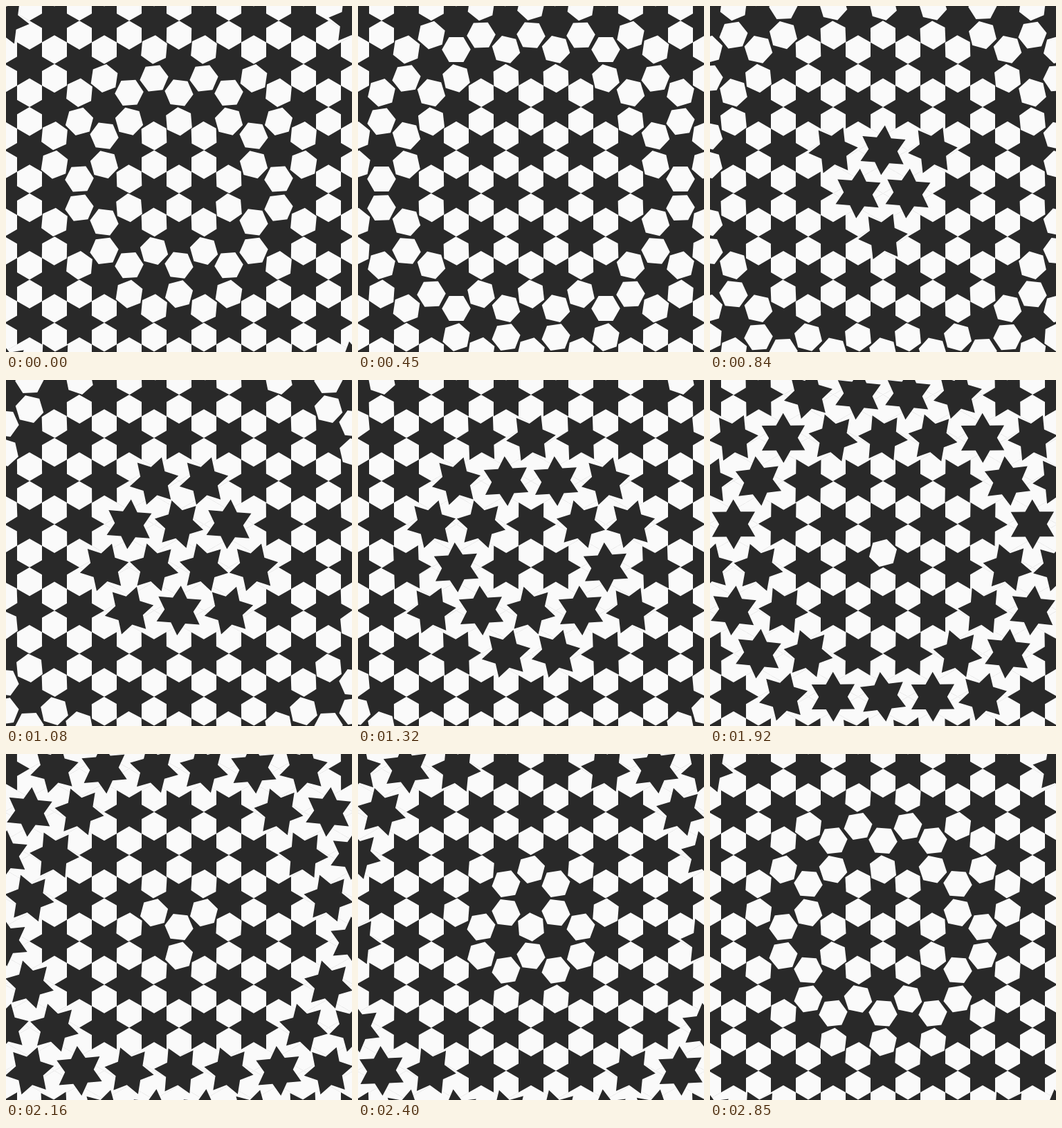
An HTML page with a canvas for the animation above (2880 ms loop, 500x500 px).

```html
<!DOCTYPE html>
<html lang="en">
<head>
<meta charset="utf-8">
<title>Stars and hexagons</title>
<style>
  html, body { margin: 0; width: 100%; height: 100%; overflow: hidden; background: #292929; }
  canvas { display: block; width: 500px; height: 500px; }
</style>
</head>
<body>
<canvas id="stage" width="500" height="500"></canvas>
<script>
const ctx = document.getElementById('stage').getContext('2d');
const DARK = '#292929', LIGHT = '#fafafa';
const LOOP = 2880, STEP = 30, TURN = 960;
const HEX_START = 1608, STAR_START = HEX_START - LOOP / 2;
const DELAY = LOOP / 500;              // ms per pixel from the centre
const GAP = 72, C = 250;
const HEX_R = GAP / 2 / Math.sqrt(3), STAR_R = GAP / 2;
const ROW = GAP * Math.sqrt(3) / 2;

const hexes = [], stars = [];
const place = (list, x, y) => list.push({ x, y, wait: Math.hypot(x - C, y - C) * DELAY });

for (let row = -5; row <= 5; row++) {
  const y = C + HEX_R + row * ROW;
  const shift = row % 2 ? 0 : GAP / 2;
  for (let col = -5; col <= 5; col++) {
    const x = C + shift + col * GAP;
    place(stars, x, y);
    place(hexes, x + GAP / 2, y - HEX_R);
    place(hexes, x + GAP / 2, y + HEX_R);
  }
}

const ease = p => p * p * (3 - 2 * p);

// Progress of a turn, or 1 and above while at rest
function progress(t, start, wait) {
  const u = (t - start - wait) % LOOP;
  return (u < 0 ? u + LOOP : u) / TURN;
}

// Adds a closed outline whose corners alternate between the given radii
function trace(x, y, radii, angle) {
  const n = 6 * radii.length;
  for (let i = 0; i < n; i++) {
    const a = angle + i * 2 * Math.PI / n;
    const r = radii[i % radii.length];
    ctx[i ? 'lineTo' : 'moveTo'](x + r * Math.cos(a), y + r * Math.sin(a));
  }
  ctx.closePath();
}

const hex = (s, turn) => trace(s.x, s.y, [HEX_R], Math.PI / 6 + turn);
const star = (s, turn) => trace(s.x, s.y, [STAR_R, HEX_R], -turn);

function paint(color, list, shape, turnOf) {
  ctx.fillStyle = color;
  for (const s of list) {
    ctx.beginPath();
    shape(s, turnOf(s));
    ctx.fill();
  }
}

function draw(t) {
  const turning = start => s => {
    const p = progress(t, start, s.wait);
    return p < 1 ? ease(p) * Math.PI / 3 : 0;
  };
  const active = stars.filter(s => progress(t, STAR_START, s.wait) < 1);

  ctx.fillStyle = DARK;
  ctx.fillRect(0, 0, 500, 500);
  paint(LIGHT, hexes, hex, turning(HEX_START));

  // Clear each moving star's cell, with a thin edge to hide seams
  ctx.beginPath();
  active.forEach(s => star(s, 0));
  ctx.fillStyle = ctx.strokeStyle = LIGHT;
  ctx.lineWidth = 0.8;
  ctx.lineJoin = 'bevel';
  ctx.fill();
  ctx.stroke();
  paint(DARK, active, star, turning(STAR_START));
}

function tick() {
  const t = performance.now() % LOOP;
  draw(Math.floor(t / STEP) * STEP);
  requestAnimationFrame(tick);
}
tick();
</script>
</body>
</html>
```
